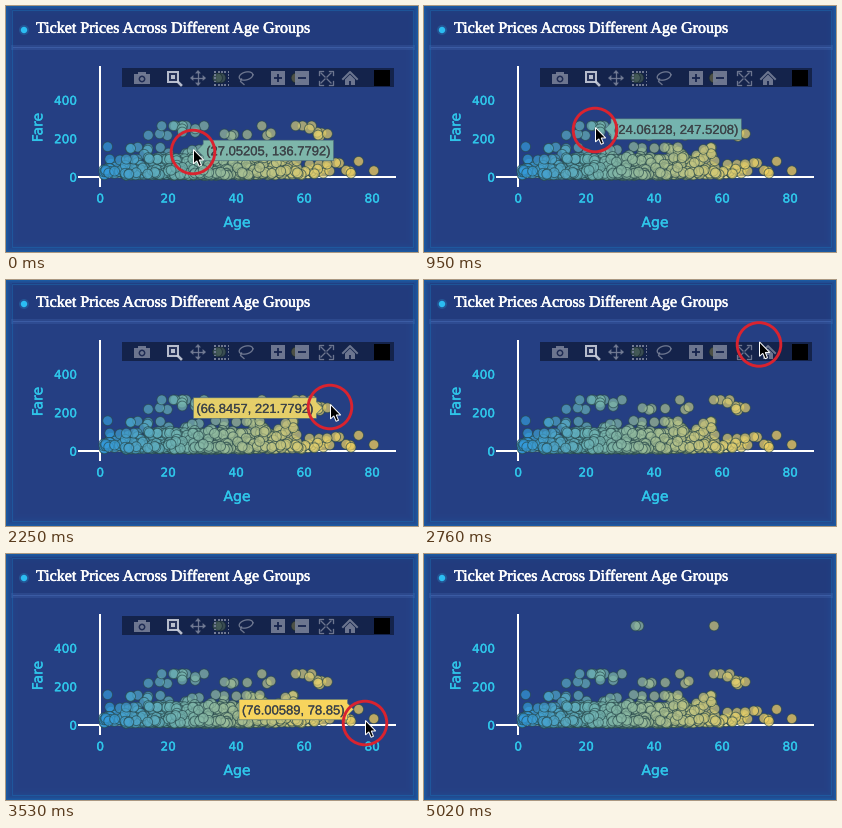
Recreate the animation shown at these times as a matplotlib script. Size 412 by 246 pixels, loop 6630 ms.

```python
import numpy as np
import matplotlib.pyplot as plt
from matplotlib.animation import FuncAnimation
from matplotlib.colors import LinearSegmentedColormap
from matplotlib.patches import Circle, Polygon, Rectangle
from matplotlib.patheffects import withStroke

W, H, DPI = 412, 246, 100
PT = 72 / DPI
LOOP, STEP = 6630, 30
CYAN, GREY, LIGHT, DARK = "#2fc6ea", "#767f97", "#c9cedb", "#16234d"

plt.rcParams["text.hinting"] = "none"
fig = plt.figure(figsize=(W / DPI, H / DPI), dpi=DPI)
ax = fig.add_axes([0, 0, 1, 1])
ax.set_xlim(0, W)
ax.set_ylim(H, 0)
ax.axis("off")

scale = LinearSegmentedColormap.from_list(
    "age", ["#2f97dc", "#6ab2b6", "#a3be94", "#d9cb72", "#ffd757"])

# the points that get a hover label
HOVERS = [(27.05205, 136.7792), (24.06128, 247.5208), (24.01134, 263),
          (66.8457, 221.7792), (76.00589, 78.85), (80.47439, 30)]


def to_x(age):
    return 94.2 + 3.4 * np.asarray(age)


def to_y(fare):
    return 170.5 - 0.1925 * np.asarray(fare)


def text(x, y, s, size, color, font="DejaVu Sans", weight=0.35, **kw):
    t = ax.text(x, y, s, fontsize=size * PT, color=color, family=font, **kw)
    t.set_path_effects([withStroke(linewidth=weight * PT, foreground=color)])
    return t


def line(xs, ys, color, width=1.0, **kw):
    return ax.plot(xs, ys, color=color, lw=width * PT, **kw)[0]


def rect(x, y, w, h, color, **kw):
    return ax.add_patch(Rectangle((x, y), w, h, fc=color, lw=0, **kw))


# ---- panel ----
def panel():
    y, x = np.mgrid[0:H, 0:W] + 0.5
    edge = np.minimum(np.minimum(x, W - x), np.minimum(y, H - y))
    glow = 0.75 * np.exp(-edge / 3.5)[..., None]
    base = np.array([38, 63, 131]) / 255
    rim = np.array([22, 103, 178]) / 255
    ax.imshow(base + (rim - base) * glow, extent=(0, W, H, 0),
              aspect="auto", zorder=0)
    rect(6, 3, 402, 38, "#203878", alpha=0.5, zorder=0.2)
    ax.add_patch(Rectangle((6.5, 3.5), 401, 237, fill=False, ec="#1c69b0",
                           lw=PT, alpha=0.5, zorder=0.5))
    for width, alpha in ((5, 0.25), (1, 0.45)):
        line([7, 406], [41, 41], "#4b70bb", width, alpha=alpha, zorder=0.6)
    for r, alpha in ((5, 0.2), (3.2, 1)):
        ax.add_patch(Circle((18, 24), r, fc="#2bbdf2", lw=0, alpha=alpha))
    text(30, 26.8, "Ticket Prices Across Different Age Groups", 16,
         "white", "Liberation Serif", 0.5)


# ---- chart ----
def axes_lines():
    line([72, 390], [170.8, 170.8], "white", 2, zorder=1,
         solid_capstyle="butt")
    line([94, 94], [60, 181], "white", 2, zorder=1, solid_capstyle="butt")
    for age in range(0, 81, 20):
        text(to_x(age), 196.5, str(age), 12, CYAN, ha="center")
    for fare in (0, 200, 400):
        text(71, to_y(fare) + 5.2, str(fare), 12, CYAN, ha="right")
    text(231, 221, "Age", 14, CYAN, ha="center")
    text(32.5, 121.5, "Fare", 14, CYAN, rotation=90, ha="center",
         va="center")


def points():
    rng = np.random.default_rng(12)
    # groups: count, age range, fare range
    groups = [(10, (12, 65), (263, 263)), (17, (14, 68), (205, 248)),
              (32, (1, 60), (110, 155)), (12, (60, 75), (8, 78)),
              (30, (0.3, 12), (8, 45)), (60, (14, 58), (60, 105))]
    ages = [rng.uniform(*a, n) for n, a, f in groups]
    fares = [rng.uniform(*f, n) for n, a, f in groups]
    crowd = rng.normal(30, 14, 700)
    crowd = crowd[(crowd > 0.3) & (crowd < 66)]
    ages += [crowd, [34.5, 35.5, 57.6], [a for a, f in HOVERS]]
    fares += [np.minimum(4 + rng.lognormal(2.9, 0.9, crowd.size), 90),
              [512] * 3, [f for a, f in HOVERS]]
    age, fare = np.concatenate(ages), np.concatenate(fares)
    order = rng.permutation(age.size)
    age, fare = age[order], fare[order]
    ax.scatter(to_x(age), to_y(fare), s=(9.8 * PT) ** 2, c=scale(age / 80.5),
               edgecolors="#27474a", linewidths=0.9 * PT, alpha=0.7, zorder=2)


# ---- toolbar ----
bar = []


def keep(artist, z=6):
    artist.set_zorder(z)
    bar.append(artist)
    return artist


def block(x, y, w, h, color=GREY):
    keep(rect(x, y, w, h, color))


def stroke(xs, ys, color=GREY, width=1.3):
    keep(line(xs, ys, color, width))


def disc(x, y, r, color):
    keep(ax.add_patch(Circle((x, y), r, fc=color, lw=0)))


def shape(pts, color=GREY):
    keep(ax.add_patch(Polygon(pts, fc=color, lw=0)))


def toolbar():
    y = 72
    keep(rect(116, 62, 272, 19, "#050a18", alpha=0.52), 5)
    # camera
    block(128, 68, 16, 10)
    block(132, 66, 8, 3)
    disc(136, 73, 3.4, DARK)
    disc(136, 73, 1.9, GREY)
    # zoom
    block(161, 65, 12, 12, LIGHT)
    block(163, 67, 8, 8, DARK)
    block(165, 69, 4, 4, LIGHT)
    stroke([172, 175], [76, 79], LIGHT, 2.6)
    # pan
    stroke([186, 198], [y, y])
    stroke([192, 192], [66, 78])
    for a in np.arange(4) * np.pi / 2:
        c, s = np.cos(a), np.sin(a)
        head = [(8, 0), (4.6, -3), (4.6, 3)]
        shape([(192 + u * c - v * s, y + u * s + v * c) for u, v in head])
    # box select
    for k in range(5):
        for px, py in ((k, 0), (k, 4), (0, k), (4, k)):
            block(208.5 + 3.3 * px, 64.8 + 3.3 * py, 1.8, 1.8)
    # lasso
    a = np.linspace(0, 2 * np.pi, 40)
    stroke(240 + 6.8 * np.cos(a), 70 + 4 * np.sin(a) - 1.2 * np.cos(a))
    stroke([235.5, 234.5, 238], [73, 75.5, 78.5])
    # zoom in, zoom out
    for x in (272, 296):
        block(x - 7, 65, 14, 14)
        block(x - 4, 71, 8, 2, DARK)
    block(271, 68, 2, 8, DARK)
    # autoscale
    for sx in (-1, 1):
        for sy in (-1, 1):
            stroke([320 + 3 * sx, 320 + 7 * sx, 320 + 7 * sx],
                   [y + 7 * sy, y + 7 * sy, y + 3 * sy])
            stroke([320 + sx, 320 + 5 * sx], [y + sy, y + 5 * sy])
    # home
    stroke([337, 344, 351], [73, 66, 73], width=2)
    shape([(339, 73.5), (344, 68.5), (349, 73.5), (349, 79), (339, 79)])
    block(343, 75, 2.5, 4, DARK)
    block(368, 64, 16, 16, "black")


panel()
axes_lines()
points()
toolbar()
bar_alpha = [a.get_alpha() or 0.9 for a in bar]
bar_alpha[-1] = 1

# ---- hover label and pointer ----
flag = ax.add_patch(Polygon([(0, 0), (1, 1), (2, 0)], lw=0.6 * PT,
                            ec="#4f6f78", zorder=3.5))
note = text(0, 0, "", 13, "#3c4348", "Liberation Sans", 0.2, zorder=4)
ring = ax.add_patch(Circle((0, 0), 21.8, fill=False, ec="#d9232f",
                           lw=2.9 * PT, zorder=8))
ARROW = np.array([(0, 0), (0, 14.4), (3.3, 11.4), (5.6, 16.8), (8, 15.8),
                  (5.8, 10.5), (10.2, 10.5)])
arrow = ax.add_patch(Polygon(ARROW, fc="black", ec="white", lw=PT, zorder=9))

# the screen refreshes in short bursts: (start, end, refreshes)
BURSTS = [(180, 440, 3), (820, 1210, 4), (1610, 2000, 4), (2250, 2890, 6),
          (3140, 3530, 4), (4640, 5020, 4)]
TICKS = np.concatenate([[0]] + [np.linspace(*b) for b in BURSTS])
TICKS = np.round(TICKS, -1)
LEAVE = TICKS[-1]

# pointer stops: time, x, y
STOPS = np.array([(0, 187, 146), (950, 171, 124), (1210, 178, 120),
                  (1610, 190, 119), (2000, 342, 124), (2250, 324, 127),
                  (2640, 331, 41), (3270, 352, 164), (3530, 359, 169),
                  (4640, 350, 170), (LEAVE, 315, 193)])


def pointer(now):
    return np.array([np.interp(now, STOPS[:, 0], STOPS[:, k])
                     for k in (1, 2)])


def show_label(at):
    """Label the hover point nearest to the pointer, if one is in reach."""
    spots = np.array([(to_x(a), to_y(f)) for a, f in HOVERS])
    gap = np.hypot(*(spots - at).T)
    k = gap.argmin()
    on = gap[k] < 25
    flag.set_visible(on)
    note.set_visible(on)
    if not on:
        return
    (x, y), (age, fare) = spots[k], HOVERS[k]
    words = f"({age}, {fare})"
    # advance widths of digits, brackets and other marks
    wide = 13 * sum(0.556 if c.isdigit() else 0.333 if c in "()" else 0.278
                    for c in words)
    side = 1 if x < 250 else -1
    tip, near = x + 5 * side, x + 11 * side
    far = near + side * (wide + 6)
    flag.set_xy([(tip, y), (near, y - 6), (near, y - 10), (far, y - 10),
                 (far, y + 10.5), (near, y + 10.5), (near, y + 6)])
    flag.set_facecolor(scale(age / 80.5))
    note.set_text(words)
    note.set_ha("left" if side > 0 else "right")
    note.set_position((near + 3 * side, y + 5.1))


def update(i):
    k = np.searchsorted(TICKS, i * STEP + 20, side="right") - 1
    now = TICKS[k]
    inside = now < LEAVE
    show_label(pointer(TICKS[max(k - 1, 0)]))  # hover lags one refresh
    spot = pointer(now)
    ring.center = spot
    arrow.set_xy(ARROW + spot + (0.5, -2.5))
    for a in (ring, arrow):
        a.set_visible(inside)
    if not inside:
        flag.set_visible(False)
        note.set_visible(False)
    fade = np.clip((LEAVE - now) / 240, 0, 1)
    for a, base in zip(bar, bar_alpha):
        a.set_visible(inside)
        a.set_alpha(base * fade)
    return [ring, arrow, flag, note] + bar


anim = FuncAnimation(fig, update, frames=LOOP // STEP, interval=STEP,
                     repeat=True, repeat_delay=0, blit=False)
plt.show()
```
